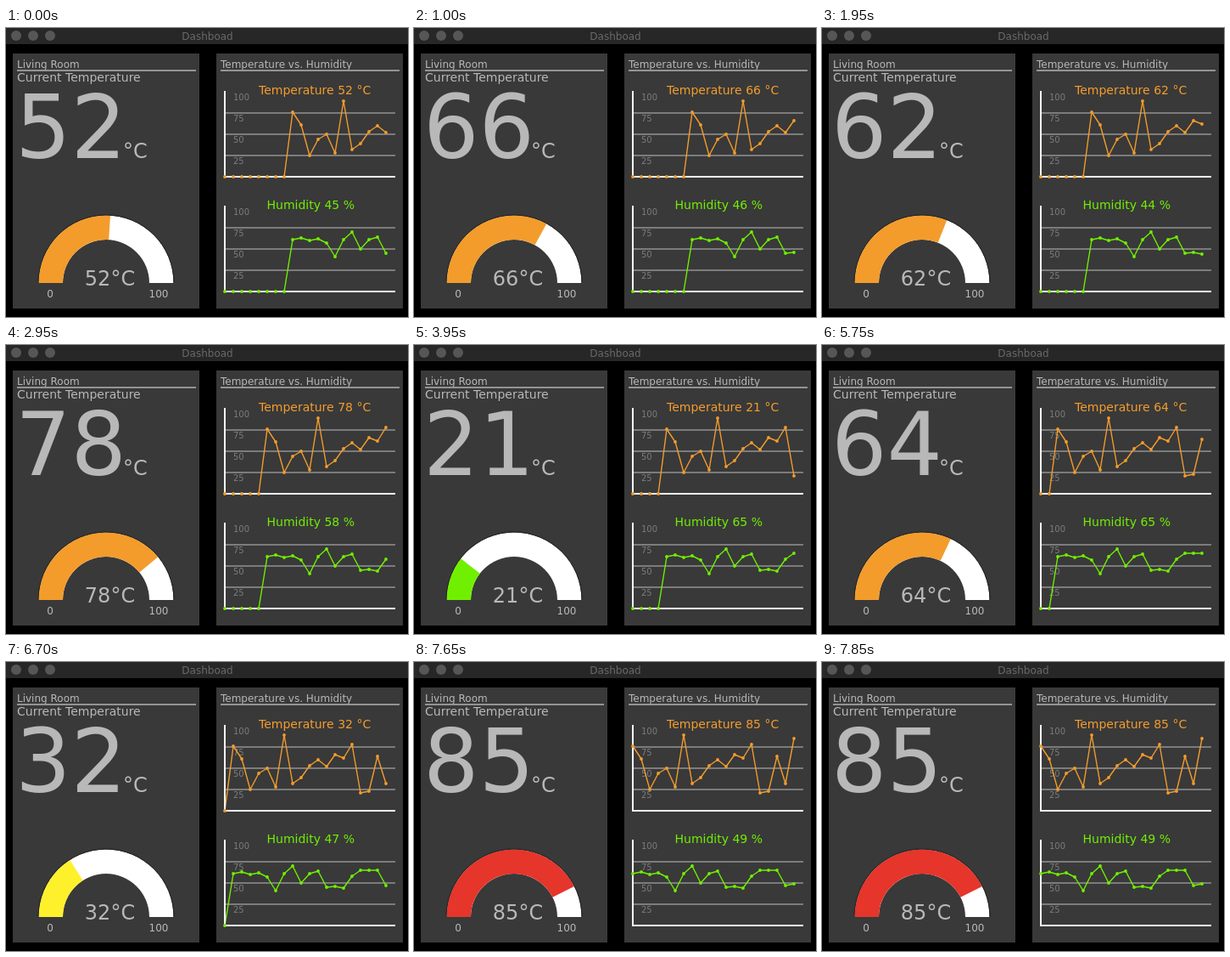
These frames come from a looping animation (474x340 px, 8000 ms). An HTML page with a canvas:

```html
<!DOCTYPE html>
<html lang="en">
<head>
<meta charset="utf-8">
<title>Dashboard</title>
<style>
html, body { margin: 0; width: 100%; height: 100%; overflow: hidden; background: #000; }
canvas { display: block; }
</style>
</head>
<body>
<canvas id="stage" width="474" height="340"></canvas>
<script>
const ctx = document.getElementById('stage').getContext('2d');
const LOOP = 8000;
const VISIBLE = 20;
const START_COUNT = 12;
const PANEL = '#393939', TEXT = '#b8b8b8', GRID = '#7c7c7c', AXIS = '#f4f4f4';
const ORANGE = '#f39c2c', GREEN = '#70f000', YELLOW = '#fff02c', RED = '#e6352b';

const temperature = [76, 61, 25, 44, 50, 28, 89, 32, 39, 53, 60, 52, 66, 62, 78, 21, 23, 64, 32, 85];
const humidity = [61, 63, 60, 62, 57, 41, 61, 70, 50, 61, 64, 45, 46, 44, 58, 65, 65, 65, 47, 49];
// Times at which a new reading arrives
const updates = [400, 1400, 2400, 3450, 4700, 5750, 6700, 7650];

function rect(x, y, w, h, color) {
  ctx.fillStyle = color;
  ctx.fillRect(x, y, w, h);
}

function disc(x, y, r, color) {
  ctx.fillStyle = color;
  ctx.beginPath();
  ctx.arc(x, y, r, 0, Math.PI * 2);
  ctx.fill();
}

function label(text, x, y, size, color = TEXT, align = 'left') {
  ctx.font = `${size}px "DejaVu Sans", sans-serif`;
  ctx.textAlign = align;
  ctx.fillStyle = color;
  ctx.fillText(text, x, y);
}

function panel(x, title) {
  rect(x, 30, 220, 300, PANEL);
  label(title, x + 5, 47, 12);
  rect(x + 5, 49, 211, 2, '#949494');
}

function ring(from, to, color) {
  const angle = v => Math.PI * (1 + v / 100);
  ctx.fillStyle = color;
  ctx.beginPath();
  ctx.arc(118, 300, 79.5, angle(from), angle(to));
  ctx.arc(118, 300, 51, angle(to), angle(from), true);
  ctx.fill();
}

function gaugeColor(v) {
  return v < 25 ? GREEN : v < 50 ? YELLOW : v < 80 ? ORANGE : RED;
}

function gauge(value) {
  ring(0, 100, '#fff');
  ring(0, value, gaugeColor(value));
  ctx.strokeStyle = '#222';
  ctx.lineWidth = 1;
  ctx.beginPath();
  ctx.arc(118, 300, 80, Math.PI, 0);
  ctx.stroke();
  label(value + '°C', 122.5, 303, 24, TEXT, 'center');
  label('0', 52, 317, 12, TEXT, 'center');
  label('100', 180, 317, 12, TEXT, 'center');
}

function chart(base, values, color, title, titleX) {
  for (let v = 25; v <= 100; v += 25) {
    if (v < 100) rect(258, base - v - 1, 201, 2, GRID);
    label(v, 268, base - v + 10, 10, GRID);
  }
  label(title, titleX, base - 97, 14, color);

  const points = values.map((v, i) => [258 + i * 10, base - v]);
  ctx.strokeStyle = color;
  ctx.lineWidth = 1.4;
  ctx.lineJoin = 'round';
  ctx.beginPath();
  points.forEach(([x, y]) => ctx.lineTo(x, y));
  ctx.stroke();
  rect(257, base - 101, 2, 102, AXIS);
  rect(257, base - 1, 202, 2, AXIS);
  points.forEach(([x, y]) => disc(x, y, 1.9, color));
}

function recent(series, count) {
  return [...Array(VISIBLE).fill(0), ...series.slice(0, count)].slice(-VISIBLE);
}

function draw(time) {
  const count = START_COUNT + updates.filter(t => time >= t).length;
  const temp = temperature[count - 1];
  const hum = humidity[count - 1];

  rect(0, 0, 474, 340, '#000');
  rect(0, 0, 474, 19, '#272728');
  [12, 32, 52].forEach(x => disc(x, 9, 6, '#565656'));
  label('Dashboad', 237.5, 14, 12, '#696969', 'center');

  panel(8, 'Living Room');
  label('Current Temperature', 13, 63, 14);
  label(temp, 11, 153, 103);
  label('°C', 138, 153, 24);
  gauge(temp);

  panel(248, 'Temperature vs. Humidity');
  chart(175, recent(temperature, count), ORANGE, `Temperature ${temp} °C`, 298);
  chart(310, recent(humidity, count), GREEN, `Humidity ${hum} %`, 307.5);
}

function tick() {
  draw(performance.now() % LOOP);
  requestAnimationFrame(tick);
}
tick();
</script>
</body>
</html>
```
